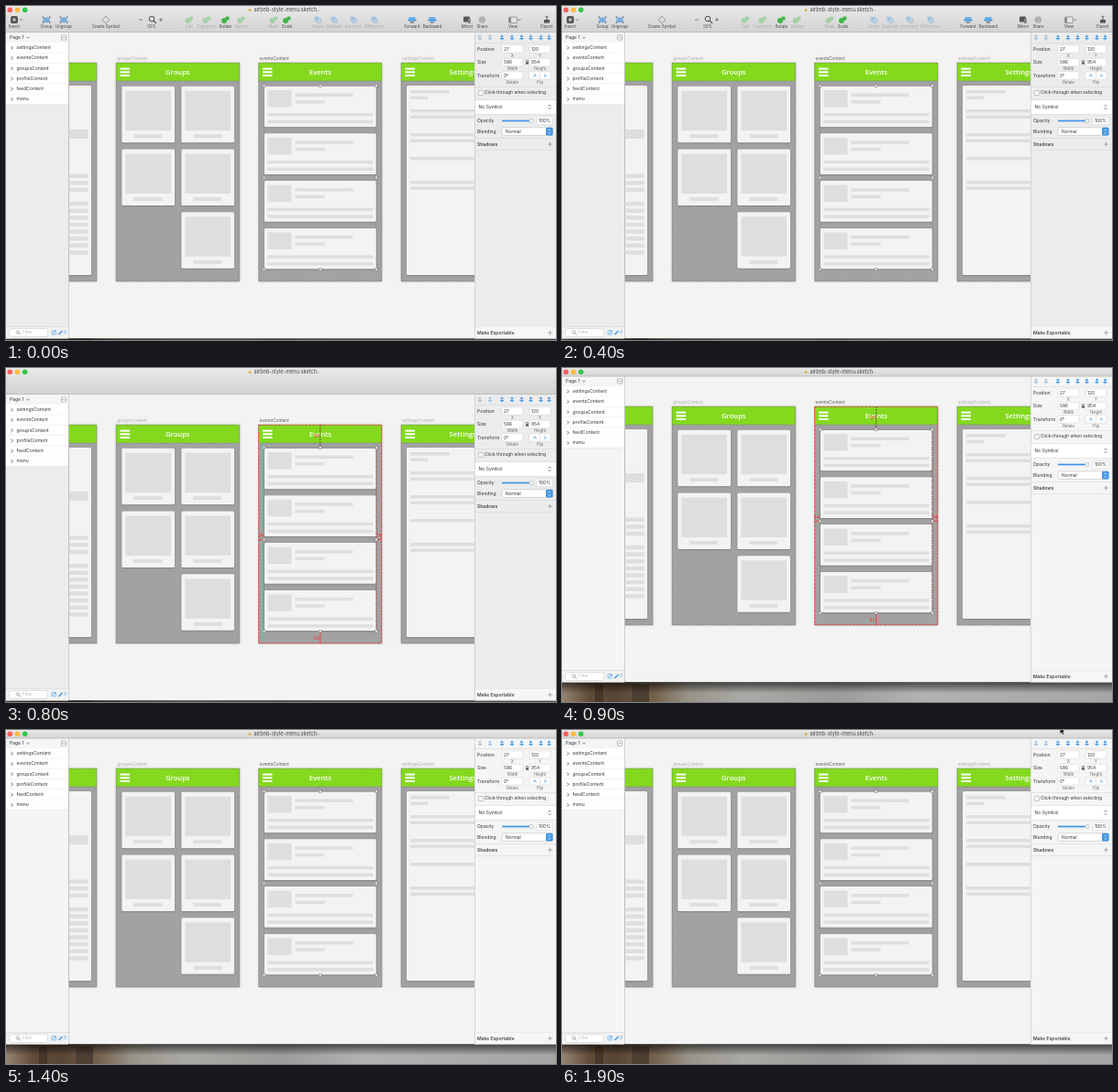
These frames come from a looping animation (600 by 365 pixels, 2000 ms). An HTML page with a canvas:

```html
<!DOCTYPE html>
<html lang="en">
<head>
<meta charset="utf-8">
<title>Hiding the toolbar</title>
<style>
  html, body { margin: 0; width: 100%; height: 100%; overflow: hidden; }
  canvas { display: block; width: 600px; height: 365px; }
</style>
</head>
<body>
<canvas></canvas>
<script>
const W = 600, H = 365, LOOP = 2000, TOOLBAR = 20;
const PANEL_TOP = 29, PANEL_HEIGHT = 334.4, WINDOW_BOTTOM = PANEL_TOP + PANEL_HEIGHT;
const GREEN = '#84d91f', BLUE = '#3f95e6', RED = '#f0413c', TEXT = '#333';
const canvas = document.querySelector('canvas');
const ctx = canvas.getContext('2d');
const dpr = window.devicePixelRatio || 1;
canvas.width = W * dpr;
canvas.height = H * dpr;

function rect(x, y, w, h, color) {
  ctx.fillStyle = color;
  ctx.fillRect(x, y, w, h);
}

function rounded(x, y, w, h, r, fill, stroke) {
  ctx.beginPath();
  ctx.roundRect(x, y, w, h, r);
  if (fill) { ctx.fillStyle = fill; ctx.fill(); }
  if (stroke) { ctx.strokeStyle = stroke; ctx.lineWidth = 0.6; ctx.stroke(); }
}

function circle(x, y, r, color) {
  ctx.beginPath();
  ctx.arc(x, y, r, 0, 7);
  ctx.fillStyle = color;
  ctx.fill();
}

function line(points, color, width = 0.7, dash = []) {
  ctx.beginPath();
  points.forEach(([x, y]) => ctx.lineTo(x, y));
  ctx.strokeStyle = color;
  ctx.lineWidth = width;
  ctx.setLineDash(dash);
  ctx.stroke();
  ctx.setLineDash([]);
}

function dashedBox(x, y, w, h, color, dash = [1.5, 1.5]) {
  line([[x, y], [x + w, y], [x + w, y + h], [x, y + h], [x, y]], color, 0.8, dash);
}

function text(str, x, y, size = 5, color = TEXT, align = 'left', weight = 400, family = 'Inter') {
  ctx.font = `${weight} ${size}px ${family}, sans-serif`;
  ctx.textAlign = align;
  ctx.textBaseline = 'middle';
  ctx.fillStyle = color;
  ctx.fillText(str, x, y);
}

function plus(x, y, color, r = 2.5) {
  line([[x - r, y], [x + r, y]], color, 0.8);
  line([[x, y - r], [x, y + r]], color, 0.8);
}

function chevron(x, y, color, flip = 1) {
  line([[x - 1.5, y - 0.8 * flip], [x, y + 0.8 * flip], [x + 1.5, y - 0.8 * flip]], color);
}

function magnifier(x, y, r, color) {
  ctx.beginPath();
  ctx.arc(x, y, r, 0, 7);
  ctx.strokeStyle = color;
  ctx.lineWidth = r / 3;
  ctx.stroke();
  line([[x + r * 0.7, y + r * 0.7], [x + r * 1.8, y + r * 1.8]], color, r / 2.5);
}

function drawDesktop(top) {
  const wash = ctx.createLinearGradient(0, 0, W, 0);
  [[0, '#968471'], [0.05, '#614c38'], [0.1, '#584535'], [0.17, '#75624d'],
   [0.23, '#999489'], [0.33, '#aaa9a6'], [0.5, '#9b9b99'], [0.65, '#b2b2b0'], [1, '#a5a5a3']]
    .forEach(([at, color]) => wash.addColorStop(at, color));
  rect(0, top - 1, W, H, wash);
  rect(36, 346, 9, 19, '#49362a');
  rect(76, 346, 19, 19, '#4d4033');
  const shade = ctx.createLinearGradient(0, top, 0, top + 12);
  shade.addColorStop(0, '#0009');
  shade.addColorStop(1, '#0000');
  rect(0, top - 1, W, 13, shade);
}

function drawTool(label, x, kind, on = true) {
  const ink = on ? '#555' : '#aaa';
  const y = 15;
  if (kind === 'green') {
    const color = on ? '#43b64a' : '#a5cfa6';
    circle(x - 1.5, y + 1, 3, color);
    rounded(x, y - 3.5, 4, 4, 1, color);
  } else if (kind === 'blue') {
    rect(x - 3.5, y - 3, 7, 2.5, '#68afe9');
    rect(x - 4.5, y - 0.5, 9, 2, BLUE);
    rect(x - 2, y + 2, 4, 1.8, '#888');
  } else if (kind === 'union') {
    rounded(x - 3.5, y - 3.5, 5, 5, 1, '#a6c5e1');
    rounded(x - 1, y - 1, 4.5, 4.5, 1, '#bcd1e4', '#9bb6d1');
  } else if (kind === 'group') {
    rect(x - 3.5, y - 2.5, 7, 5.5, '#78adde');
    [-4.3, 3].forEach(dx => [-3.5, 2.3].forEach(dy => rect(x + dx, y + dy, 1.3, 1.3, '#555')));
  } else if (kind === 'insert') {
    rounded(x - 4, y - 4, 8, 8, 2, '#555');
    plus(x, y, '#fff', 2);
    chevron(x + 7.5, y, ink);
  } else if (kind === 'export') {
    rect(x - 3, y, 6, 3.5, ink);
    line([[x, y + 1], [x, y - 4]], ink, 1);
    chevron(x, y - 3.5, ink, -1);
  } else if (kind === 'view') {
    rounded(x - 4.5, y - 3, 9, 6.5, 1, '#e3e3e3', '#666');
    rect(x - 4, y - 2.5, 2, 5.5, '#888');
    chevron(x + 7, y, ink);
  } else if (kind === 'share') {
    circle(x, y, 3.8, '#b2b2b2');
  } else if (kind === 'mirror') {
    rounded(x - 4, y - 3.5, 7, 6, 1, '#555');
    rect(x + 1, y - 1, 3, 5, '#888');
  } else if (kind === 'symbol') {
    line([[x - 4, y], [x, y - 4], [x + 4, y], [x, y + 4], [x - 4, y]], '#999', 1);
  }
  text(label, x, 23, 4.4, on ? '#444' : '#aaa', 'center');
}

function drawToolbar() {
  drawTool('Insert', 9, 'insert');
  drawTool('Group', 44, 'group');
  drawTool('Ungroup', 63, 'group');
  drawTool('Create Symbol', 109, 'symbol');
  line([[145, 15], [149, 15]], '#666', 0.8);
  magnifier(159, 14, 2.8, '#444');
  plus(169, 15, '#666', 2);
  text('50%', 159, 23, 4.4, '#444', 'center');
  [['Edit', 200, 0], ['Transform', 219, 0], ['Rotate', 239.5, 1], ['Flatten', 256.5, 0],
   ['Mask', 292, 0], ['Scale', 306.5, 1]]
    .forEach(([label, x, on]) => drawTool(label, x, 'green', !!on));
  [['Union', 340], ['Subtract', 358], ['Intersect', 379], ['Difference', 402]]
    .forEach(([label, x]) => drawTool(label, x, 'union', false));
  drawTool('Forward', 443, 'blue');
  drawTool('Backward', 465, 'blue');
  drawTool('Mirror', 503, 'mirror');
  drawTool('Share', 519.5, 'share');
  drawTool('View', 553, 'view');
  drawTool('Export', 590, 'export');
}

function drawWindowBar(height, showTools) {
  const metal = ctx.createLinearGradient(0, 0, 0, height);
  metal.addColorStop(0, '#e9e9e9');
  metal.addColorStop(1, '#d2d2d2');
  rect(0, 0, W, height, metal);
  rect(0, height - 0.6, W, 0.6, '#b3b3b3');
  ['#fc605b', '#fdbc40', '#34c84a'].forEach((color, i) => circle(4.3 + i * 8.2, 4.2, 2.8, color));
  circle(266, 4.5, 1.5, '#e0b04a');
  text('airbnb-style-menu.sketch', 270.5, 4.7, 5.6, '#444');
  chevron(340.5, 5, '#aaa');
  if (showTools) drawToolbar();
}

function drawSidebar(background) {
  rect(0, PANEL_TOP, 68, PANEL_HEIGHT, background);
  rect(0, PANEL_TOP, 68, 11, '#f5f5f5');
  text('Page 1', 4, 34.5);
  chevron(24, 34.5, '#555');
  rounded(60.5, 32, 5, 5, 0.6, '#fff', '#888');
  line([[61.5, 34.5], [64.5, 34.5]], '#888', 0.6);
  ['settings', 'events', 'groups', 'profile', 'feed', 'menu'].forEach((name, i) => {
    const y = 45.7 + i * 11.25;
    rect(0, y - 5.7, 68, 11.2, '#fff');
    rect(0, y + 5.2, 68, 0.5, '#ddd');
    line([[5.5, y - 1.7], [7.5, y], [5.5, y + 1.7]], '#555', 0.8);
    text(name === 'menu' ? name : name + 'Content', 11.5, y);
  });
  rect(0, 350, 68, WINDOW_BOTTOM - 350, '#f2f2f2');
  rect(0, 350, 68, 0.5, '#ccc');
  rounded(3.5, 352.5, 42, 9, 2, '#fff', '#ccc');
  magnifier(13, 356.5, 1.7, '#777');
  text('Filter', 18, 357, 4.7, '#bbb');
  rounded(50, 354.5, 4.5, 4.5, 0.5, '#fff', BLUE);
  line([[51, 358], [54, 355]], BLUE, 1);
  line([[57.5, 359], [61.5, 355]], BLUE, 1.5);
  text('0', 63, 357, 4.5, BLUE);
  rect(68, PANEL_TOP, 0.8, PANEL_HEIGHT, '#c6c6c6');
}

function card(x, y, w, h) {
  ctx.save();
  ctx.shadowColor = '#0005';
  ctx.shadowBlur = 1.5 * dpr;
  ctx.shadowOffsetY = 0.5 * dpr;
  rounded(x, y, w, h, 1.5, '#f3f3f3');
  ctx.restore();
}

const bar = (x, y, w, h = 3.5) => rect(x, y, w, h, '#dedede');

function drawArtboard(x, label, title, content, active) {
  ctx.save();
  ctx.shadowColor = '#0005';
  ctx.shadowBlur = 2 * dpr;
  rect(x, 62, 134.5, 239, '#a2a2a2');
  ctx.restore();
  rect(x, 62, 134.5, 20, GREEN);
  line([[x, 82], [x + 134.5, 82]], '#777', 0.8, [1, 1]);
  [67.6, 71.3, 75].forEach(y => rect(x + 4.5, y, 10.5, 2, '#fff'));
  text(title, x + 67.3, 72.7, 7.6, '#fff', 'center', 600, 'Open Sans');
  text(label, x + 1, 58, 4.7, active ? '#555' : '#aaa');
  content(x);
  dashedBox(x + 0.3, 62.3, 134, 238.5, '#666b', [1, 1]);
}

function profileContent(x) {
  card(x + 6, 87, 122.5, 207);
  bar(x + 76, 135, 49, 10);
  for (let i = 0; i < 12; i++)
    if (i !== 3) bar(x + 10, 183.5 + i * 7.6, 115, 4.5);
}

function groupsContent(x) {
  for (let i = 0; i < 6; i++) {
    if (i === 4) continue;
    const cx = x + 6.3 + (i % 2) * 65, cy = 87.7 + Math.floor(i / 2) * 68.8;
    card(cx, cy, 57.7, 61.5);
    bar(cx + 4, cy + 5, 49.7, 43.5);
    bar(cx + 13, cy + 52.5, 31, 4);
  }
}

function eventsContent(x) {
  for (let i = 0; i < 4; i++) {
    const y = 87.5 + i * 51.8;
    card(x + 6, y, 122.5, 44.7);
    bar(x + 10, y + 4.5, 26, 18.5);
    bar(x + 40, y + 8, 63);
    bar(x + 40, y + 15.5, 32);
    bar(x + 10, y + 29.5, 115);
    bar(x + 10, y + 37.2, 115);
  }
}

function settingsContent(x) {
  card(x + 6, 87, 122.5, 207);
  bar(x + 10, 92, 43);
  bar(x + 10, 98.5, 19);
  for (let i = 0; i < 4; i++) {
    bar(x + 10, 113 + i * 26, 115);
    if (i !== 2) bar(x + 10, 119.5 + i * 26, 115);
  }
}

function drawSelection() {
  const [left, top, right, bottom] = [281.5, 87.3, 404, 287.7];
  line([[left, top], [right, top], [right, bottom], [left, bottom], [left, top]], '#8b8b8b', 0.5);
  for (const x of [left, (left + right) / 2, right])
    for (const y of [top, (top + bottom) / 2, bottom])
      if (x !== (left + right) / 2 || y !== (top + bottom) / 2) {
        rect(x - 1.5, y - 1.5, 3, 3, '#777');
        rect(x - 1, y - 1, 2, 2, '#fff');
      }
}

function drawGuides() {
  dashedBox(275.5, 62.3, 134.2, 238.5, RED, [3, 1.2]);
  dashedBox(281.5, 87.3, 122.5, 200.4, '#555');
  line([[404, 88], [404, 287]], RED, 0.6, [4, 2]);
  line([[342.8, 62], [342.8, 87]], '#633', 0.8, [2, 1]);
  line([[342.8, 288], [342.8, 301]], RED, 1);
  line([[275.5, 187.5], [281.5, 187.5]], RED, 1);
  line([[404, 187.5], [410, 187.5]], RED, 1);
  text('20', 339, 74, 5, RED, 'center', 600);
  text('32', 338.5, 295, 5, RED, 'center', 600);
  text('14', 278, 183.5, 5, RED, 'center', 600);
  text('14', 407, 183.5, 5, RED, 'center', 600);
}

function drawStage(guides) {
  ctx.save();
  ctx.beginPath();
  ctx.rect(68.8, PANEL_TOP, 442.2, PANEL_HEIGHT);
  ctx.clip();
  rect(68, PANEL_TOP, 444, PANEL_HEIGHT, '#f3f3f3');
  drawArtboard(-35.5, 'profileContent', 'Profile', profileContent);
  drawArtboard(120, 'groupsContent', 'Groups', groupsContent);
  drawArtboard(275.5, 'eventsContent', 'Events', eventsContent, true);
  drawArtboard(431, 'settingsContent', 'Settings', settingsContent);
  if (guides) drawGuides();
  drawSelection();
  ctx.restore();
}

function field(x, y, w, value, caption) {
  rounded(x, y - 4.2, w, 8.4, 0.5, '#fff', '#d6d6d6');
  text(value, x + 2, y + 0.2, 4.9);
  if (caption) text(caption, x + w / 2, y + 7.3, 4.2, '#666', 'center');
}

function drawInspector(background) {
  rect(511, PANEL_TOP, 89, PANEL_HEIGHT, background);
  [40, 88, 102.5, 118, 144.5, 157, 350].forEach(y => rect(511, y, 89, 0.5, '#d3d3d3'));
  [517, 528, 541, 552, 562.5, 572.5, 583.5, 592.5].forEach((x, i) => {
    const color = i > 1 ? BLUE : '#9dbcd8';
    rect(x - 0.3, 31.5, 0.6, 6, color);
    rect(x - 1.5, 32.5, 3, 1.3, color);
    rect(x - 2, 35, 4, 1.3, color);
  });
  text('Position', 514, 47);
  field(541, 47, 23, '27', 'X');
  field(571, 47, 23, '120', 'Y');
  text('Size', 514, 61.5);
  field(541, 61.5, 23, '586', 'Width');
  field(571, 61.5, 23, '954', 'Height');
  rect(567, 61.3, 3, 2.3, '#555');
  line([[567.5, 61.3], [567.5, 59.5], [569.5, 59.5], [569.5, 61.3]], '#555', 0.6);
  text('Transform', 514, 76);
  field(541, 76, 23, '0°', 'Rotate');
  field(571, 76, 23, '', 'Flip');
  line([[582.5, 72], [582.5, 80]], '#ccc', 0.5);
  line([[575.5, 77.5], [577, 74.5], [578.5, 77.5]], BLUE, 0.7);
  line([[587, 74.5], [589.5, 76], [587, 77.5]], BLUE, 0.7);
  rounded(515.5, 92.5, 5, 5, 0.8, '#fff', '#999');
  text('Click-through when selecting', 522, 95, 4.85);
  rect(511, 103, 89, 15, '#fff');
  text('No Symbol', 515.5, 110.5);
  chevron(593, 108.8, '#666', -1);
  chevron(593, 112, '#666');
  text('Opacity', 514, 125.5);
  line([[541, 125.5], [573, 125.5]], BLUE, 1.7);
  circle(573, 125.5, 2.3, '#aaa');
  circle(573, 125.5, 1.8, '#fff');
  field(579, 125.5, 17.5, '100%');
  text('Blending', 514, 137);
  rounded(541, 132.8, 55.5, 8.6, 1.5, '#fff', '#bbb');
  rounded(589, 132.8, 7.5, 8.6, 1.5, BLUE);
  chevron(592.8, 135.6, '#fff', -1);
  chevron(592.8, 138.7, '#fff');
  text('Normal', 545, 137.2, 4.9);
  text('Shadows', 514, 151, 5, '#444', 'left', 600);
  plus(593.5, 151, '#999');
  rect(511, 350.5, 89, WINDOW_BOTTOM - 350.5, '#f6f6f6');
  text('Make Exportable', 514, 357, 5, '#444', 'left', 600);
  plus(593.5, 357, '#999');
  rect(511, PANEL_TOP, 0.6, PANEL_HEIGHT, '#c3c3c3');
}

function drawCursor(x, y) {
  ctx.beginPath();
  [[0, -3], [0, 4], [1.6, 2.6], [2.8, 5], [3.8, 4.5], [2.7, 2.2], [4.6, 2]]
    .forEach(([dx, dy]) => ctx.lineTo(x + dx, y + dy));
  ctx.closePath();
  ctx.fillStyle = '#222';
  ctx.fill();
}

function draw(t) {
  const collapsed = t >= 900;
  const guides = t >= 500 && t < 1100;
  const shift = collapsed ? TOOLBAR : 0;
  const panel = collapsed ? '#f5f5f5' : '#ececec';
  ctx.setTransform(dpr, 0, 0, dpr, 0, 0);
  drawDesktop(WINDOW_BOTTOM - shift);
  ctx.save();
  ctx.translate(0, -shift);
  drawSidebar(panel);
  drawStage(guides);
  drawInspector(panel);
  ctx.restore();
  drawWindowBar(collapsed ? 9.3 : 29, t < 700);
  if (t >= 1900) drawCursor(543.5, 0);
}

function tick() {
  draw(performance.now() % LOOP);
  requestAnimationFrame(tick);
}
tick();
</script>
</body>
</html>
```
